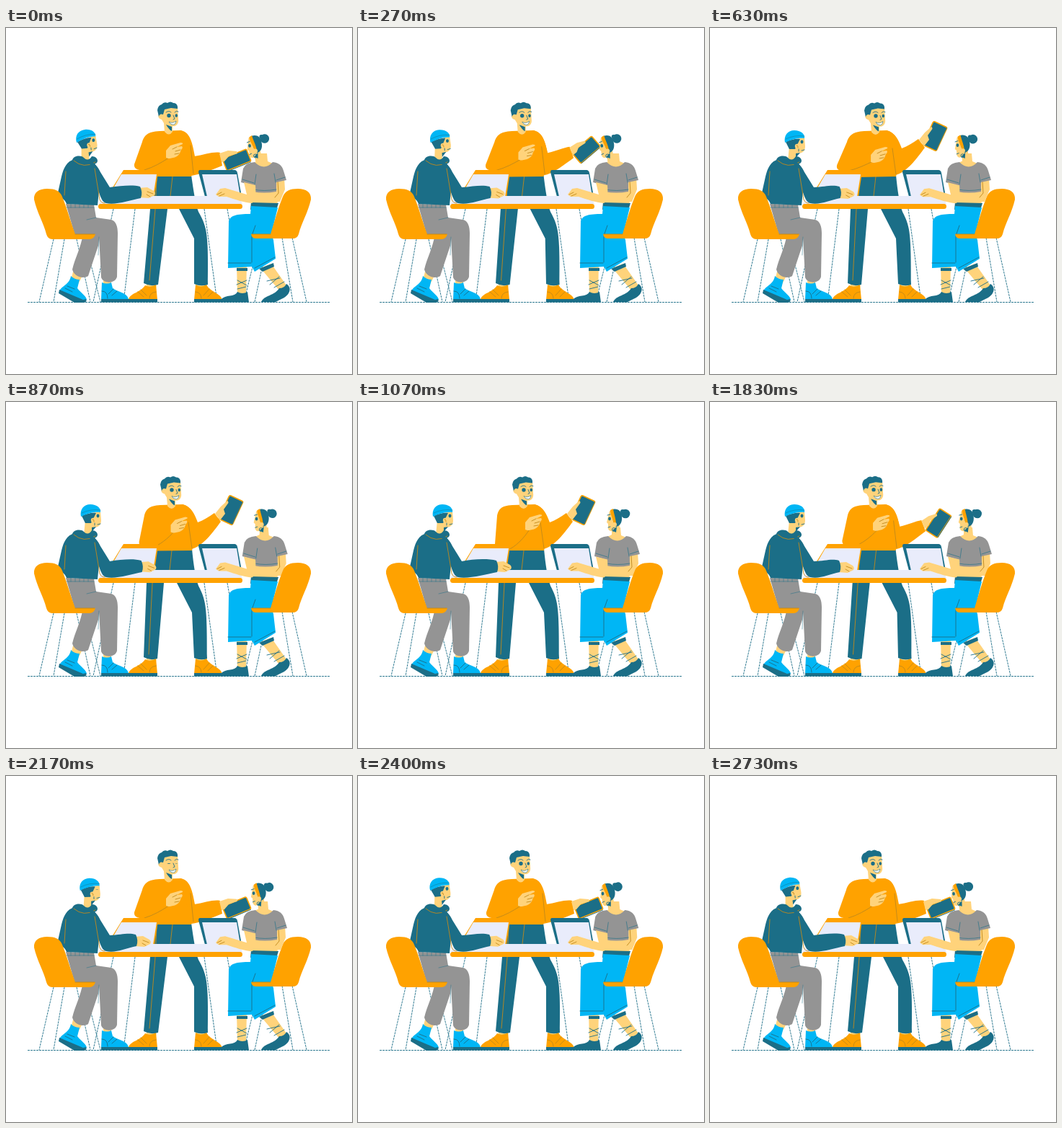
Write an HTML page that moves like this. It is 480 px wide and 480 px high and loops after 3.2 s.

```html
<!DOCTYPE html>
<html lang="en">
<head>
<meta charset="utf-8">
<title>Team meeting</title>
<style>
html, body { margin: 0; width: 100%; height: 100%; overflow: hidden; background: #fff; }
svg { display: block; width: 100vw; height: 100vh; }
.o { fill: #ffa200; } .t { fill: #1b6e87; } .b { fill: #00b6f5; }
.s { fill: #ffd37b; } .g { fill: #949494; } .v { fill: #e9ecfb; }
.l, .y, .d { fill: none; stroke: #1b6e87; stroke-width: .9; stroke-linecap: round; stroke-linejoin: round; }
.y { stroke: #c08a1c; }
.d { stroke-dasharray: 3 1; stroke-linecap: butt; }
</style>
</head>
<body>
<svg viewBox="0 0 480 480">
  <path class="d" d="M30 380.5H449"/>
  <path class="d" d="M149 251L121 380M179 251L163 380M275 251L293 380M307 251L330 380"/>

  <!-- presenter -->
  <path class="s" d="M196 350H209L208 362H194ZM264 350H278L279 362H264Z"/>
  <path class="o" d="M193 357Q200 361 208 356L210 377H170C171 368 187 367 193 357ZM263 356Q270 361 278 356C283 366 298 368 300 377H261Z"/>
  <path class="t" d="M170 376H210V380.5H170ZM261 376H300Q302 380 298 380.5H261Z"/>
  <path class="y" d="M183 366L191 373M187 363L195 371M199 375Q199 367 208 366M282 362L274 371M287 366L280 373M263 366Q271 367 271 375"/>
  <path class="t" id="legs"/>
  <path class="y" id="seam"/>
  <path class="o" id="torso"/>
  <path class="o" id="raise"/>
  <path class="y" id="side"/>
  <path class="y" id="fore"/>
  <g id="tabletAt">
    <rect id="tablet" class="t" stroke="#ffa200" stroke-width="1.6" rx="2"/>
    <path class="l" d="M-17 10H17" stroke-width="1.2"/>
  </g>
  <path class="s" id="grip"/>
  <g id="point">
    <path class="s" d="M222 180L222 170L228 163L242 159Q246 159 245 161L237 165L244 164Q246 166 243 169L241 174C238 179 231 181 225 181Z"/>
    <path class="y" d="M237 165L231 168M242 169L235 171M240 174L234 175"/>
  </g>
  <g id="head">
    <path class="s" d="M219 132L220 144Q226 151 231 144V136C237 137 240 132 239 126L238 109L217 113L215 119C210 119 210 126 216 127Z"/>
    <path class="t" d="M222 134L230 137V143Q226 141 222 134Z"/>
    <path class="t" d="M212 123L210 114Q211 107 216 106Q219 102 224 104Q228 101 232 104Q237 104 238 109L238 112L229 111L220 113L218 120Q213 118 212 123Z"/>
    <path class="l" d="M222 117Q226 114 229 117M234 117Q236 114 239 116M232 121L234 126L232 127"/>
    <path d="M226 130Q231 133 236 129Q235 135 231 134Q228 134 226 130Z" fill="#fff" stroke="#1b6e87" stroke-width=".6"/>
    <path class="t blink" data-y="121.5" d="M223.3 121.5a2.7 2.7 0 1 0 5.4 0a2.7 2.7 0 1 0-5.4 0M234.5 121.5a1.8 2.3 0 1 0 3.6 0a1.8 2.3 0 1 0-3.6 0"/>
  </g>

  <!-- table and laptops -->
  <path class="o" d="M163 197H209Q212 197 211 200L206 234H140Z"/>
  <path class="v" d="M160 203H209L204 234H142Z"/>
  <path class="t" d="M269 197H317Q320 197 321 201L327 234H276L267 200Q267 197 269 197Z"/>
  <path class="v" d="M272 203H320L325 234H279Z"/>
  <path class="v" d="M134 233H324L328 245H128Z"/>
  <rect class="o" x="128" y="244" width="200" height="7" rx="3.5"/>

  <!-- woman -->
  <path class="d" d="M397 291L417 380M383 291L398 380M364 291L345 380M352 291L330 380"/>
  <path class="s" d="M320 328H334L333 368H321ZM353 333L368 327L389 357L379 364Z"/>
  <path class="t" d="M320 333H335V337H320ZM351 334L371 326L372 331L356 338Z"/>
  <path class="t" d="M298 377C305 369 317 374 321 366Q328 370 335 366L337 380.5H299ZM354 380C359 370 372 372 379 361Q386 361 389 355C397 360 394 369 386 374L373 380.5Z"/>
  <path class="l" d="M320 356L334 350M321 350L334 357M321 362L333 359M362 351L380 347M366 356L379 345M372 360L386 352"/>
  <path class="s" d="M342 224H376L377 248H341Z"/>
  <g id="rearArm">
    <path class="s" d="M374 210L388 208L389 224L382 241L372 241Z"/>
    <path class="y" d="M379 213L380 229L375 235"/>
  </g>
  <path class="t" d="M340 242L378 243L375 252H339Z"/>
  <path class="b" d="M340 247L377 249L368 286L371 294L374 320L345 338L341 331L308 333L309 269C310 260 320 258 339 258Z"/>
  <path class="l" d="M308 326H340M341 325V288L346 274M345 333L373 318"/>
  <g id="bust">
    <path class="s" d="M352 174H364L365 185L372 188L360 197L346 187L352 184Z"/>
    <path class="g" d="M347 186Q360 199 372 186C381 187 385 191 387 198L391 211L377 214L377 227Q360 230 344 227L345 219L328 214L331 195Q334 187 347 186Z"/>
    <path class="l" d="M347 217L349 203M376 214L374 202M330 210L346 215M377 211L389 207M345 224Q360 227 377 224" stroke-opacity=".7"/>
  </g>
  <g id="womanHead">
    <path class="s" d="M349 151L347 159L345 167L347 169L347 176Q349 181 354 178V186H364L362 164L355 149Z"/>
    <path class="t" d="M353 178L359 173L358 181Z"/>
    <path class="t" d="M351 150C358 146 366 150 366 159C367 167 363 173 357 173L354 165Z"/>
    <circle class="t" cx="371" cy="155" r="6.3"/>
    <circle class="t" cx="367" cy="152" r="3"/>
    <path class="o" d="M350 150L354 148C355 156 358 162 358 170L355 172C355 163 350 158 350 150Z"/>
    <circle class="s" cx="356" cy="170" r="3"/>
    <circle class="l" cx="355" cy="177" r="2.5"/>
    <path class="l" d="M346 157L350 156M347 174L350 173"/>
    <ellipse class="t" id="womanEye" cx="349" cy="162" rx="1.9" ry="2.4"/>
  </g>
  <g id="womanArm">
    <path class="s" d="M330 214L346 218C347 231 346 241 341 243C330 242 318 238 306 234L295 234L291 231L297 223L304 222L334 231Z"/>
    <path class="y" d="M293 231L299 228M296 233L303 230"/>
  </g>
  <path class="o" d="M423 238C424 228 416 223 405 223C394 223 387 226 384 234C377 251 372 270 367 286H340Q341 292 347 292H398Q404 292 406 286C410 270 419 256 423 238Z"/>
  <path class="y" d="M341 286H367"/>

  <!-- man in the cap -->
  <path class="d" d="M66 293L46 380M81 293L66 380M98 293L117 380M109 293L131 380"/>
  <path class="s" d="M93 338L106 344L100 355L90 350ZM135 345H146V358H135Z"/>
  <path class="g" d="M107 285H130L128 302L114 344C106 349 94 344 92 335C95 321 104 305 107 285Z"/>
  <path class="g" d="M83 244L122 245L125 263L146 266C153 268 155 276 155 285L154 345C152 355 135 355 132 346L129 289L96 289Z"/>
  <path class="l" d="M84 249H122M90 244V249M96 244V249M102 244V249M108 244V249M114 244V249M112 266L125 263M129 290L128 315" stroke-opacity=".55"/>
  <path class="b" d="M90 344Q95 349 102 349L99 361C104 368 111 371 112 377L107 380L74 365C78 357 88 356 90 344ZM133 353Q140 356 146 353L148 361C156 367 169 367 170 377H132Z"/>
  <path class="t" d="M74 363L107 377L111 376Q113 380 108 381H95L73 368ZM132 376H170V380.5H132Z"/>
  <path class="l" d="M85 358L95 362M82 361L92 366M149 362L142 369M154 365L147 371M133 365Q141 365 141 375"/>
  <path class="t" d="M95 182C84 185 80 194 77 206L71 233C77 235 82 238 84 244L127 246L131 205C128 193 123 186 114 182Z"/>
  <path class="y" d="M83 199L81 232"/>
  <path class="o" d="M39 238C38 228 46 223 57 223C68 223 75 226 78 234C85 251 90 270 96 286H124Q122 293 116 293H64Q58 293 56 286C52 270 43 256 39 238Z"/>
  <path class="y" d="M96 286H123"/>
  <g id="capHead">
    <path class="s" d="M120 154L131 152L132 164C132 171 128 174 121 174L119 178V186Q114 190 108 184L110 164Z"/>
    <path class="t" d="M105 158C112 155 119 153 125 154L121 162L118 168L110 168ZM119 174L125 173L119 180Z"/>
    <path class="b" d="M104 159C102 149 108 142 117 142C126 142 132 147 131 153C122 152 112 155 104 159Z"/>
    <path class="l" d="M105 154Q117 148 131 150" stroke-opacity=".5"/>
    <circle class="s" cx="121" cy="164" r="3.2"/>
    <path class="y" d="M120 163Q122 162 122 166"/>
    <path class="l" d="M123 168V171M127 170L131 169"/>
    <path class="t blink" data-y="158" d="M125.5 158a2 2.4 0 1 0 4 0a2 2.4 0 1 0-4 0"/>
  </g>
  <path class="t" d="M92 183C94 177 104 176 108 180Q114 186 119 178C125 178 129 183 126 187C116 195 96 194 92 183Z"/>
  <path class="y" d="M94 184Q108 196 124 186"/>
  <g id="typing">
    <path class="s" d="M184 222L196 221L205 226Q208 229 206 232L198 236L184 235Z"/>
    <path class="y" d="M196 227L204 230M195 231L200 234"/>
  </g>
  <path class="t" id="sleeve"/>
  <path class="y" d="M123 195L130 238Q132 243 137 243"/>
</svg>
<script>
const LOOP = 3200;
const $ = id => document.getElementById(id);
const num = /-?[\d.]+/g;

// Blend the numbers of two matching strings between eased keys
function tween(t, keys) {
  let i = keys.findIndex(k => k[0] > t);
  if (i < 0) return keys.at(-1)[1];
  const [t0, a] = keys[i - 1], [t1, b] = keys[i];
  const u = (t - t0) / (t1 - t0), k = u * u * (3 - 2 * u);
  const to = b.match(num);
  let n = 0;
  return a.replace(num, v => +v + (to[n++] - v) * k);
}

const swing = (a, b, up0 = 0, up1 = 600, down0 = 1430, down1 = 2200) =>
  [[0, a], [up0, a], [up1, b], [down0, b], [down1, a]];
const reach = (a, b, c) => [[0, a], [600, b], [1070, c], [1430, c], [2180, a]];
const lean = (a, b) => swing(a, b, 200, 1070, 1750, 2600);

const sleeve = x => `M113 183C122 186 128 193 131 200L144 221C160 ${219 - x / 4} ${175 + x} 217 ${186 + x} 220`
  + `Q${190 + x} 228 ${187 + x} 236C${172 + x} 239 152 246 139 243C131 241 128 225 121 197Z`;
const typing = [[0, 0], [560, -7], [1070, 6], [1430, 2], [1830, -7], [2170, -6], [2730, 0]];

const tracks = [
  ['legs', 'd', swing(
    'M207 204L257 204C260 225 263 245 267 255C279 276 281 285 280 356Q270 359 261 355L261 292L240 251L232 236L224 251L211 356Q200 359 191 354L200 251Z',
    'M203 204L258 204C260 225 263 245 267 255C278 276 279 285 279 356Q270 359 261 355L258 292L237 251L230 236L219 251L210 356Q200 359 191 354L195 251Z')],
  ['seam', 'd', swing('M231 206L228 233M209 210L207 252L199 350', 'M230 206L227 233M205 210L203 252L198 350')],
  ['torso', 'd', reach(
    'M213 143C196 144 192 149 189 158L178 189C177 196 184 198 194 197L207 197L206 206L257 206L262 178C258 155 254 144 242 142Z',
    'M214 143C198 144 193 149 190 158L176 190C174 198 182 199 192 198L206 197L203 207L258 206L265 172C262 155 256 144 245 142Z',
    'M214 143C198 144 195 149 193 158L190 197C191 205 200 207 208 206L207 206L206 206L258 206L265 172C262 155 256 144 245 142Z')],
  ['raise', 'd', swing(
    'M242 142C254 145 257 155 261 178C275 176 288 171 297 173L300 191C285 197 270 203 257 205Z',
    'M245 142C257 145 262 156 266 167C274 164 282 159 289 154L298 166C289 178 273 201 257 204Z')],
  ['side', 'd', swing('M256 163L260 202', 'M253 167L258 203')],
  ['fore', 'd', reach('M192 197C205 193 215 187 226 180', 'M192 198C205 195 215 190 226 185', 'M208 205C217 202 231 189 239 175')],
  ['tabletAt', 'transform', [
    [0, 'translate(320 183) rotate(-22)'], [600, 'translate(312 150) rotate(-65)'],
    [1430, 'translate(312 150) rotate(-65)'], [1830, 'translate(317 168) rotate(-57)'],
    [2200, 'translate(320 183) rotate(-22)']]],
  ['tablet', 'height', swing('18', '21')],
  ['tablet', 'y', swing('-9', '-10.5')],
  ['grip', 'd', swing(
    'M296 174L308 170L320 171Q323 174 318 175L309 178L303 185L299 186Z',
    'M290 155L298 145L307 137Q310 139 307 142L302 149L304 155L297 164Z')],
  ['point', 'transform', [
    [0, 'translate(0 0)'], [600, 'translate(1 6)'], [1070, 'translate(10 -3)'],
    [1430, 'translate(9 -5)'], [2180, 'translate(0 0)']]],
  ['head', 'transform', swing('translate(0 0)', 'translate(4 0.5)', 0, 600, 1400, 2050)],
  ['capHead', 'transform', swing('translate(-4 -1) rotate(-6 114 178)', 'translate(0 0) rotate(0 114 178)', 0, 600, 1950, 2700)],
  ['womanHead', 'transform', lean('translate(-8 0) rotate(-8 358 184)', 'translate(0 0) rotate(0 358 184)')],
  ['bust', 'transform', lean('translate(-2 0)', 'translate(0 0)')],
  ['rearArm', 'transform', lean('translate(-2 0)', 'translate(0 0)')],
  ['sleeve', 'd', typing.map(([t, x]) => [t, sleeve(x)])],
  ['typing', 'transform', typing.map(([t, x]) => [t, `translate(${x} ${x < 0 ? 1 : 0})`])],
  ['womanArm', 'transform', lean('translate(0 0)', 'translate(0 0.5)')],
  ['womanEye', 'ry', [[0, '2.4'], [2570, '2.4'], [2650, '0.4'], [2730, '2.4']]]
];
$('tablet').setAttribute('x', -18);
$('tablet').setAttribute('width', 36);

const lids = [[0, '1'], [2070, '1'], [2150, '0.15'], [2190, '0.15'], [2270, '1']];
const eyes = document.querySelectorAll('.blink');

function draw(now) {
  const t = now % LOOP;
  for (const [id, attr, keys] of tracks) $(id).setAttribute(attr, tween(t, keys));
  const open = +tween(t, lids);
  for (const e of eyes)
    e.setAttribute('transform', `translate(0 ${e.dataset.y * (1 - open)}) scale(1 ${open})`);
  requestAnimationFrame(draw);
}
draw(0);
</script>
</body>
</html>
```
